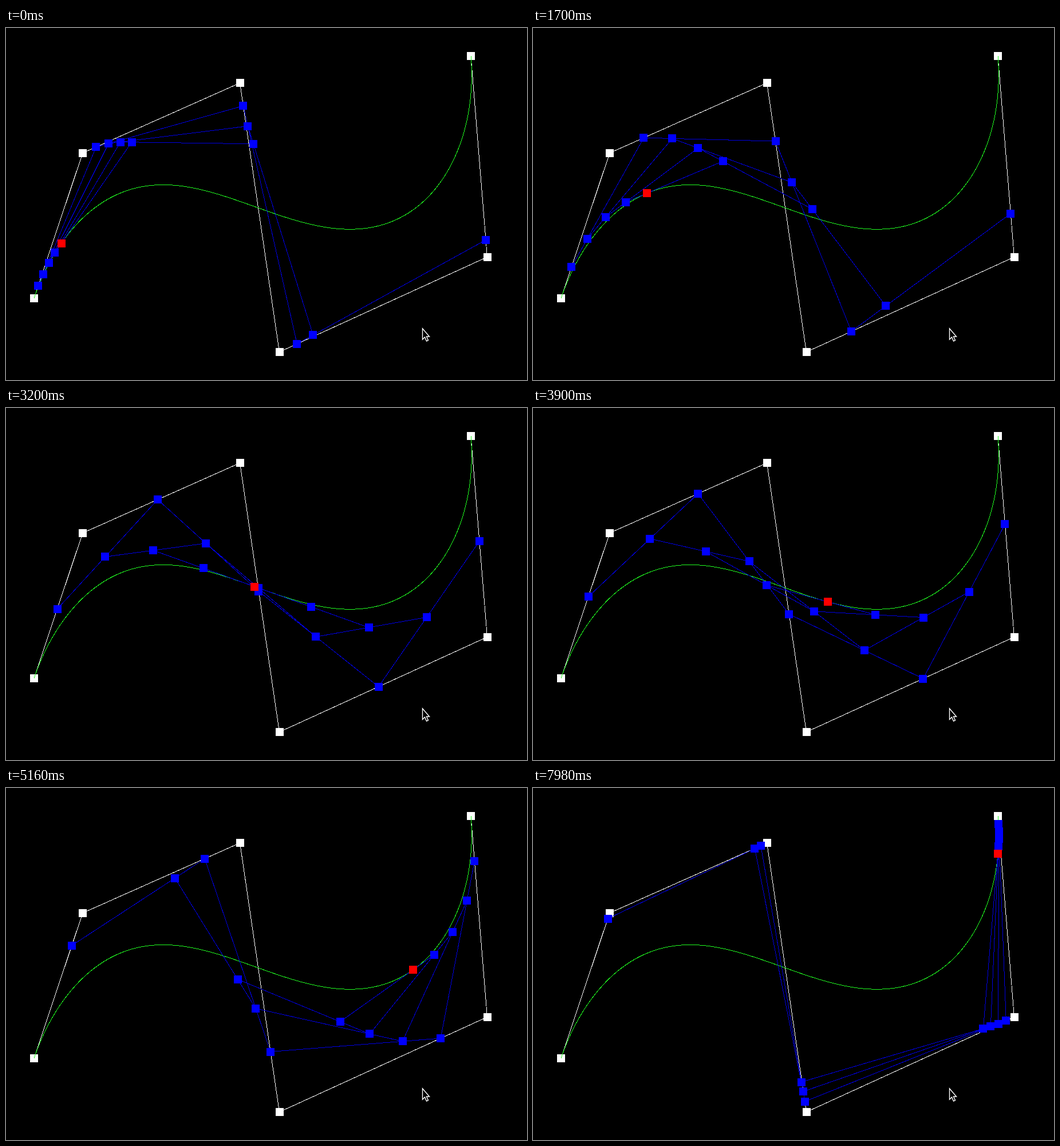
These frames come from a looping animation (910 px wide and 616 px high, 8 s). An HTML page:

```html
<!DOCTYPE html>
<html>
<head>
<meta charset="utf-8">
<style>
  html, body { margin: 0; width: 100%; height: 100%; overflow: hidden; background: #000; }
  svg { display: block; }
  polyline { fill: none; }
</style>
</head>
<body>
<svg width="910" height="616" shape-rendering="crispEdges">
  <g id="fixed"></g>
  <g id="moving"></g>
  <path d="M727.5 526v19l4-4 3 7 3-1.5-3-6.5h5z" fill="none" stroke="#fff" stroke-width="1.4" shape-rendering="auto"/>
</svg>
<script>
const LOOP = 8000;
const SIZE = 14;
const control = [[49, 473], [134, 218.7], [408.6, 96.2], [477.5, 567], [840.5, 400.8], [812, 49]];

// The curve parameter is steered by hand: a few [step, value] keys, smoothed between.
const keys = [[0, .085], [37, .2165], [68, .477], [97, .642], [110, .776], [136, .984], [171, .961]];

// Steps come in threes every 140 ms: two short holds, one long.
function stepAt(ms) {
  const rest = ms % 140;
  return 3 * Math.floor(ms / 140) + (rest >= 20) + (rest >= 120);
}

function slope(i) {
  if (i === 0) return 0;
  const before = keys[i - 1], after = keys[i + 1] || keys[i];
  return (after[1] - before[1]) / (after[0] - before[0]);
}

// Cubic Hermite interpolation of the keys.
function parameterAt(step) {
  const i = Math.max(0, keys.findIndex(key => key[0] >= step) - 1);
  const [n0, v0] = keys[i], [n1, v1] = keys[i + 1];
  const span = n1 - n0, s = (step - n0) / span, r = 1 - s;
  return r * r * (1 + 2 * s) * v0 + s * s * (3 - 2 * s) * v1
    + span * s * r * (r * slope(i) - s * slope(i + 1));
}

// All rounds of de Casteljau interpolation, ending with the single curve point.
function casteljau(t) {
  const levels = [];
  let points = control;
  while (points.length > 1) {
    const from = points;
    points = from.slice(1).map((p, i) => p.map((v, k) => from[i][k] + (v - from[i][k]) * t));
    levels.push(points);
  }
  return levels;
}

const line = (points, color) => `<polyline points="${points.join(' ')}" stroke="${color}"/>`;

function squares(points, color) {
  return points.map(([x, y]) => `<rect x="${Math.round(x) - SIZE / 2}" y="${Math.round(y) - SIZE / 2}"
    width="${SIZE}" height="${SIZE}" fill="${color}"/>`).join('');
}

const fixed = document.getElementById('fixed');
const moving = document.getElementById('moving');
const curve = Array.from({ length: 201 }, (_, i) => casteljau(i / 200).pop()[0]);
fixed.innerHTML = line(control, '#fff') + squares(control, '#fff') + line(curve, '#20ff20');

function draw(step) {
  const levels = casteljau(parameterAt(step));
  const tip = levels.pop();
  moving.innerHTML = levels.map(level => line(level, '#0000e0')).join('')
    + squares(levels.flat(), '#00f') + squares(tip, '#f00');
}

const start = performance.now();
let shown = -1;
function tick() {
  const step = stepAt((performance.now() - start) % LOOP);
  if (step !== shown) draw(shown = step);
  requestAnimationFrame(tick);
}
tick();
</script>
</body>
</html>
```
